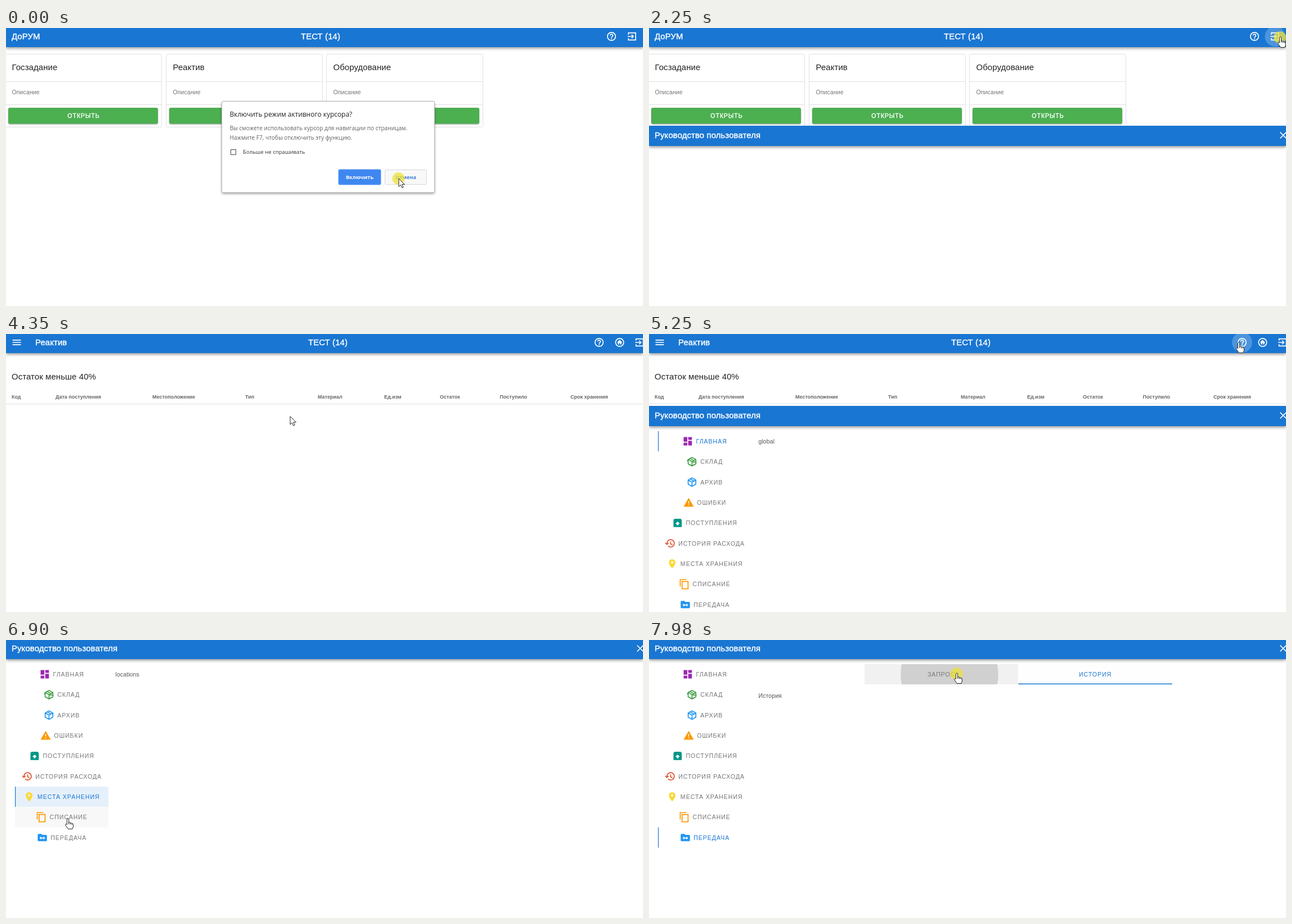
Write an HTML page with a canvas that moves like this. It is 1132 px wide and 495 px high and loops after 8 s.

```html
<!DOCTYPE html>
<html lang="ru">
<head>
<meta charset="utf-8">
<style>
  html, body { margin: 0; height: 100%; overflow: hidden; background: #fff; }
  canvas { display: block; }
</style>
</head>
<body>
<canvas width="1132" height="495"></canvas>
<script>
const W = 1132, H = 495, LOOP = 8000;
const BLUE = '#1976d2', GREEN = '#4caf50', GREY = '#757575', DARK = '#212121';
const SANS = '"Liberation Sans", Arial, sans-serif', UI = '"Open Sans", "Noto Sans", sans-serif';
const ctx = document.querySelector('canvas').getContext('2d');

// Icons live on a 24-unit grid; the stroked ones are outlines.
const HELP = 'M3 12a9 9 0 1 1 18 0 9 9 0 1 1-18 0M9 10a3 3 0 1 1 4.5 2.6Q12 13.5 12 15.2M12 16.2v2';
const EXIT = 'M4 8V4H20V20H4V16M2 12H15M11 8L15 12 11 16';
const CLOSE = 'M5 5L19 19M19 5L5 19';
const BURGER = 'M2 6.5H22M2 12H22M2 17.5H22';
const RING = 'M3 12a9 9 0 1 1 18 0 9 9 0 1 1-18 0';
const HOUSE = 'M12 6.5L6 12H8V16.5H11V13H13V16.5H16V12H18Z';
const CUBE = 'M12 2.8L20.3 7.4V16.6L12 21.2 3.7 16.6V7.4ZM3.7 7.4L12 12 20.3 7.4M12 12V21M7.8 5.1L16.2 9.7';
const ARROW = 'M0 0V14.5L3.4 11.4 5.7 16.6 8.1 15.5 5.8 10.5H10.4Z';
const HAND = 'M-1.6 8V.5Q-1.6-1 0-1T1.6.5V6Q4 5 4.4 7 6.8 6 7.2 8 9.5 7.5 9.5 9.5V13L8 17.5H.5L-4.5 10.5Q-5 7.5-1.6 9.5Z';

const MENU = [
  ['ГЛАВНАЯ', 'global', '#9c27b0', 'M13 3H21V9H13ZM13 11H21V21H13ZM3 3H11V13H3ZM3 15H11V21H3Z'],
  ['СКЛАД', 'storage', '#43a047', CUBE + 'M12 12L22 13.5M1.5 11L3.7 7.4', true],
  ['АРХИВ', 'archive', '#2196f3', CUBE, true],
  ['ОШИБКИ', 'errors', '#ff9800', 'M1 21L12 2 23 21ZM11 9H13V14H11ZM11 16H13V18H11Z'],
  ['ПОСТУПЛЕНИЯ', 'receipts', '#009688', 'M5 3H19L21 6V21H3V6ZM12 9L7 14H10V17H14V14H17Z'],
  ['ИСТОРИЯ РАСХОДА', 'history', '#e0522d', 'M5 12a8 8 0 1 1 2.4 5.7M1.5 11L5 14.5 8.5 11M13 8v5l4 2.4', true],
  ['МЕСТА ХРАНЕНИЯ', 'locations', '#fdd835', 'M12 22C5 14 5 11 5 9A7 7 0 0 1 19 9C19 11 19 14 12 22ZM9.5 9A2.5 2.5 0 1 0 14.5 9 2.5 2.5 0 1 0 9.5 9Z'],
  ['СПИСАНИЕ', 'writeoff', '#ff9800', 'M7 6H20V22H7ZM3 17V2H16', true],
  ['ПЕРЕДАЧА', '', '#2196f3', 'M2 6Q2 4 4 4H10L12 6H20Q22 6 22 8V18Q22 20 20 20H4Q2 20 2 18ZM6 13L9.5 9.5V12H14.5V9.5L18 13 14.5 16.5V14H9.5V16.5Z']
];
const COLUMNS = [['Код', 10], ['Дата поступления', 88], ['Местоположение', 260], ['Тип', 425],
  ['Материал', 554], ['Ед.изм', 672], ['Остаток', 771], ['Поступило', 877.5], ['Срок хранения', 1003]];

// Pointer moves: start, end, x, y, vertical bend.
const MOVES = [
  [240, 800, 994, 184, 0], [1110, 1260, 1078, 19, 0], [2040, 2150, 1122, 17, 0],
  [2850, 3420, 492, 152, 60], [4320, 4660, 1048, 16, -30], [5300, 5550, 106, 92, 0],
  [5760, 5900, 107, 131, 0], [6010, 6110, 108, 168, 0], [6180, 6290, 108, 204, 0],
  [6360, 6460, 109, 240, 0], [6520, 6620, 109, 276, 0], [6760, 6890, 110, 319, 0],
  [7020, 7120, 110, 350, 0], [7360, 7600, 790, 61, 0], [7700, 7890, 547, 60, 0]
];
const MENU_CLICKS = [5100, 5600, 5980, 6150, 6330, 6500, 6720, 6980, 7160];
const TAB_CLICKS = [7930, 7640];
const CLICKS = [-70, 1290, 2180, 3570, ...MENU_CLICKS, ...TAB_CLICKS];
const HAND_TIMES = [[1220, 1620], [2130, 2300], [3440, 3600], [4600, 5360], [5500, 7420], [7560, LOOP]];

const clamp = v => Math.min(1, Math.max(0, v));
const easeOut = p => 1 - (1 - clamp(p)) ** 3;
const smooth = p => p * p * (3 - 2 * p);
const flash = dt => dt < 0 ? 0 : .22 * clamp(1 - dt / 350);

// y is the middle of the capitals; the baseline snaps to whole pixels.
function text(str, x, y, size, color, { font = SANS, weight = 400, spacing = .0094, center, heavy } = {}) {
  ctx.font = `${weight} ${size}px ${font}`;
  ctx.letterSpacing = spacing * size + 'px';
  const width = ctx.measureText(str).width;
  const left = center ? x - width / 2 : x, baseline = Math.round(y + size * .36);
  ctx.fillStyle = ctx.strokeStyle = color;
  ctx.fillText(str, left, baseline);
  if (heavy) {
    ctx.lineWidth = .4;
    ctx.strokeText(str, left, baseline);
  }
  return width;
}
const caps = (str, x, y, color, heavy) => text(str, x, y, 10.6, color, { spacing: .0893, center: true, heavy });

function rect(x, y, w, h, color, { radius = 0, border, shadow = 0 } = {}) {
  ctx.save();
  ctx.beginPath();
  ctx.roundRect(x, y, w, h, radius);
  if (shadow) {
    ctx.shadowColor = 'rgba(0,0,0,.4)';
    ctx.shadowBlur = shadow;
    ctx.shadowOffsetY = shadow / 2;
  }
  ctx.fillStyle = color;
  ctx.fill();
  ctx.restore();
  if (border) {
    ctx.lineWidth = 1;
    ctx.strokeStyle = border;
    ctx.stroke();
  }
}

function disc(x, y, r, color) {
  ctx.beginPath();
  ctx.arc(x, y, r, 0, 7);
  ctx.fillStyle = color;
  ctx.fill();
}

function icon(path, x, y, color, stroked, scale = .82) {
  ctx.save();
  ctx.translate(x, y);
  ctx.scale(scale, scale);
  ctx.translate(-12, -12);
  ctx.fillStyle = ctx.strokeStyle = color;
  ctx.lineWidth = 2.1;
  if (stroked) ctx.stroke(new Path2D(path));
  else ctx.fill(new Path2D(path), 'evenodd');
  ctx.restore();
}

const heading = (str, x, y, color = DARK) => text(str, x, y, 14.9, color, { spacing: .0075, heavy: color === '#fff' });
const bar = () => rect(0, -6, W, 40, BLUE, { shadow: 5 });

function pointer(t) {
  let x = 698, y = 268;
  for (const [start, end, tx, ty, bend] of MOVES) {
    if (t < start) break;
    const p = smooth(clamp((t - start) / (end - start)));
    x += (tx - x) * p;
    y += (ty - y) * p + bend * Math.sin(Math.PI * p);
  }
  return { x, y };
}

function headerIcon(path, x, mouse) {
  if (Math.hypot(mouse.x - x, mouse.y - 15) < 18) disc(x, 15, 18, 'rgba(255,255,255,.22)');
  icon(path, x, 15, '#fff', true, .8);
}

function homePage(mouse) {
  bar();
  heading('ДоРУМ', 10, 15, '#fff');
  heading('ТЕСТ (14)', 524, 15, '#fff');
  headerIcon(HELP, 1076, mouse);
  headerIcon(EXIT, 1112.5, mouse);
  ['Госзадание', 'Реактив', 'Оборудование'].forEach((title, i) => {
    const x = Math.round(-2 + 285.7 * i);
    rect(x + .5, 46.5, 278, 130, '#fff', { radius: 3, border: '#e0e0e0' });
    rect(x, 95, 279, 1, '#e0e0e0');
    rect(x, 136, 279, 1, '#e0e0e0');
    heading(title, x + 12.5, 70);
    text('Описание', x + 12.5, 114.5, 10.55, GREY);
    const hover = mouse.x > x + 6 && mouse.x < x + 272 && mouse.y > 142 && mouse.y < 171;
    rect(x + 6, 142, 266, 28.5, hover ? '#79c47c' : GREEN, { radius: 3, shadow: hover ? 4 : 2 });
    caps('ОТКРЫТЬ', x + 140, 156, '#fff', true);
  });
}

function caretDialog() {
  const ui = { font: UI, spacing: 0 }, bold = { font: UI, spacing: 0, weight: 700, center: true };
  rect(383.5, 130.5, 378, 162.5, '#fff', { radius: 2, border: '#b0b0b0', shadow: 4 });
  text('Включить режим активного курсора?', 397.5, 154, 11.95, '#222', ui);
  text('Вы сможете использовать курсор для навигации по страницам.', 397.5, 178.5, 10.14, '#5f6368', ui);
  text('Нажмите F7, чтобы отключить эту функцию.', 397.5, 195, 10.14, '#5f6368', ui);
  rect(399.5, 216.5, 9, 9, '#fff', { border: '#444' });
  text('Больше не спрашивать', 421, 221, 9.6, '#333', ui);
  rect(591, 252, 75, 27, '#3f87f0', { radius: 2, border: '#5a98f2' });
  text('Включить', 628.5, 265.5, 9.2, '#fff', bold);
  rect(673.5, 252.5, 74, 26, '#f8f8f8', { radius: 2, border: '#d5d7db' });
  text('Отмена', 710.5, 265.5, 9.2, '#3f80d8', bold);
}

function reagentPage(t, mouse) {
  bar();
  icon(BURGER, 19, 15, '#fff', true, .75);
  heading('Реактив', 52, 15, '#fff');
  heading('ТЕСТ (14)', 537, 15, '#fff');
  headerIcon(HELP, 1054, mouse);
  headerIcon(RING, 1090.5, mouse);
  icon(HOUSE, 1090.5, 15, '#fff', false, .8);
  headerIcon(EXIT, 1126, mouse);
  heading('Остаток меньше 40%', 10, 75.5);
  if (t < 3660) return;
  for (const [label, x] of COLUMNS) text(label, x, 111.5, 9, '#666', { weight: 700, spacing: 0 });
  rect(0, 124, W, 1, '#e0e0e0');
}

function transferTabs(t, mouse) {
  const active = t >= TAB_CLICKS[1] ? 1 : 0;
  ['ЗАПРОС', 'ИСТОРИЯ'].forEach((label, i) => {
    const x = 383 + 273.3 * i, dt = t - TAB_CLICKS[i];
    if (mouse.y > 43 && mouse.y < 79 && mouse.x > x && mouse.x < x + 273) rect(x, 43, 273, 36, i === active ? '#f3f7fc' : '#f1f1f1');
    if (dt >= 0) {
      ctx.save();
      ctx.beginPath();
      ctx.rect(x, 43, 273, 36);
      ctx.clip();
      const tint = i === active ? '25,118,210' : '0,0,0';
      disc(i ? 790 : 534, 61, 1.7 * dt, `rgba(${tint},${flash(dt) * .74})`);
      ctx.restore();
    }
    caps(label, x + 136.7, 61, i === active ? BLUE : GREY);
  });
  rect(383 + 273.3 * easeOut((t - TAB_CLICKS[1]) / 300), 77.5, 273.5, 1.5, BLUE);
  text(active ? 'История' : 'Запрос', 194.5, 99, 10.5, '#555');
}

function guideMenu(t, mouse) {
  const rowY = i => 61 + 36.35 * i;
  const active = MENU_CLICKS.findLastIndex(c => t >= c);
  MENU.forEach(([label, , color, path, stroked], i) => {
    const y = rowY(i), top = y - 18;
    const hover = mouse.x > 16 && mouse.x < 182 && Math.abs(mouse.y + 2 - y) < 18.1;
    if (hover && i !== active) rect(16, top, 166, 36, '#f8f8f8');
    if (i && i === active) rect(16, top, 166, 36, `rgba(25,118,210,${flash(t - MENU_CLICKS[i])})`);
    const width = caps(label, 111.2, y, i === active ? BLUE : GREY);
    icon(path, 111 - width / 2 - 14.5, y, color, stroked);
  });
  const from = rowY(Math.max(0, active - 1));
  const slide = easeOut((t - MENU_CLICKS[active]) / 200);
  rect(16, from + (rowY(active) - from) * slide - 18, 1.2, 36, BLUE);
  if (active === 8) transferTabs(t, mouse);
  else text(MENU[active][1], 194.5, 61, 10.5, '#555');
}

function guideOffset(t) {
  if (t >= 5143) return H * (1 - easeOut((t - 5143) / 300));
  if (t >= 2210) return H * easeOut((t - 2210) / 300);
  return t >= 1400 ? H * (1 - easeOut((t - 1320) / 300)) : H;
}

function guide(t, mouse) {
  const y = Math.round(guideOffset(t));
  if (y >= H - 1) return;
  ctx.save();
  ctx.translate(0, y);
  rect(0, 0, W, H, '#fff', { shadow: y > 1 ? 4 : 0 });
  ctx.beginPath();
  ctx.rect(0, -2, W, H);
  ctx.clip();
  bar();
  heading('Руководство пользователя', 10, 15, '#fff');
  icon(CLOSE, 1127, 15, '#fff', true, .78);
  if (t > 5000) guideMenu(t, { x: mouse.x, y: mouse.y - y });
  ctx.restore();
}

function cursor(t, { x, y }) {
  if (CLICKS.some(c => t >= c - 20 && t < c + 90)) disc(x - .5, y, 11, 'rgba(238,226,50,.72)');
  const hand = HAND_TIMES.some(([a, b]) => t >= a && t < b);
  const shape = new Path2D(hand ? HAND : ARROW);
  ctx.save();
  ctx.translate(x, y);
  ctx.fillStyle = '#fff';
  ctx.strokeStyle = '#222';
  ctx.lineWidth = 1;
  ctx.fill(shape);
  ctx.stroke(shape);
  if (hand) ctx.stroke(new Path2D('M1.6 6V9M4.4 7V9.5M7.2 8V10'));
  ctx.restore();
}

function draw(now) {
  const t = now % LOOP, mouse = pointer(t);
  ctx.fillStyle = '#fff';
  ctx.fillRect(0, 0, W, H);
  if (t < 3630) homePage(mouse);
  else reagentPage(t, mouse);
  if (t < 30) caretDialog();
  guide(t, mouse);
  cursor(t, mouse);
  requestAnimationFrame(draw);
}
requestAnimationFrame(draw);
</script>
</body>
</html>
```
